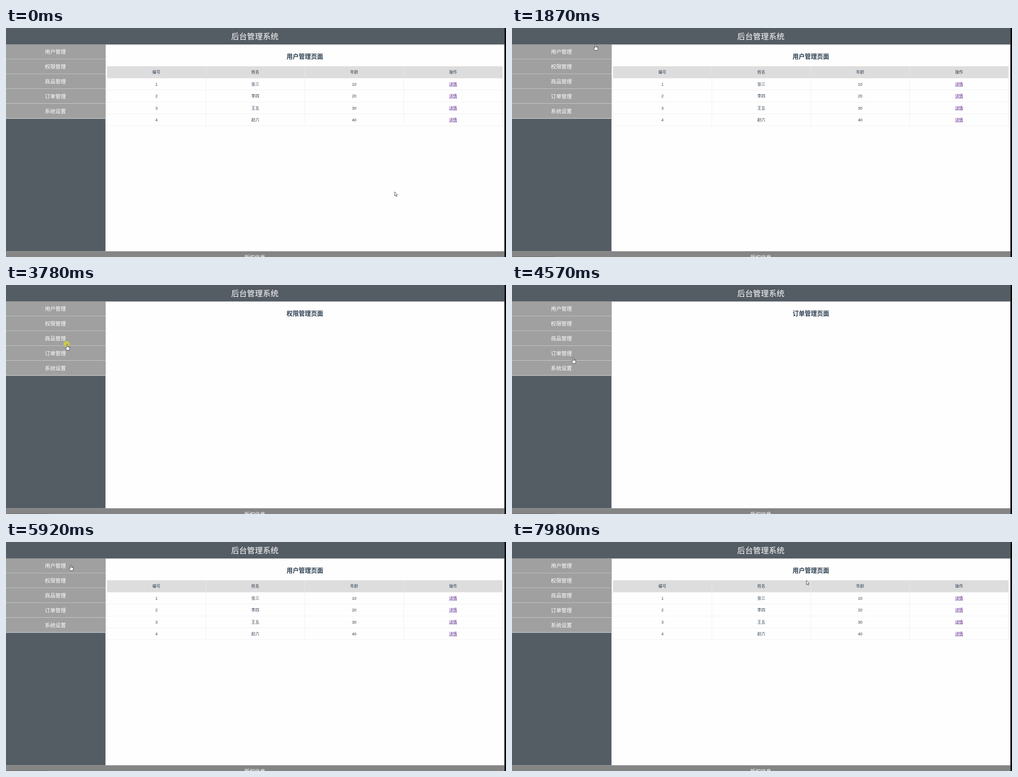
An HTML page for the animation above (8000 ms loop, 1103 by 508 pixels).

```html
<!DOCTYPE html>
<html lang="zh-CN">
<head>
<meta charset="utf-8">
<title>后台管理系统</title>
<style>
  html, body { margin: 0; width: 100%; height: 100%; overflow: hidden; background: #fefefe; }
  svg { display: block; width: 100%; height: 100%; }
  text { font-family: "Liberation Sans", "Noto Sans CJK SC", "Noto Sans CJK", sans-serif; text-anchor: middle; }
</style>
</head>
<body>
<svg id="stage" viewBox="0 0 1103 508" xmlns="http://www.w3.org/2000/svg"></svg>
<script>
const NS = 'http://www.w3.org/2000/svg';
const stage = document.getElementById('stage');
const LOOP = 8000, STEP = 80;
const INK = '#2c3e50';

function add(tag, attrs, parent = stage) {
  const el = document.createElementNS(NS, tag);
  for (const k in attrs) el.setAttribute(k, attrs[k]);
  parent.appendChild(el);
  return el;
}
const rect = (x, y, width, height, fill, parent) => add('rect', { x, y, width, height, fill }, parent);

// Text centred on (x, cy)
function label(str, x, cy, size, fill, parent = stage, weight = 400) {
  const el = add('text', { x, y: cy + size * 0.37, 'font-size': size, fill, 'font-weight': weight }, parent);
  el.textContent = str;
  return el;
}
const show = (el, on) => el.setAttribute('visibility', on ? 'visible' : 'hidden');
const inside = (x, y, l, t, r, b) => x >= l && x <= r && y >= t && y <= b;

// Layout: a page with 50px header and 45px menu items, scaled down
const S = 0.7315, HEAD = 50 * S, SIDE = 300 * S, ITEM = 45 * S, RIGHT = 1099.5, FOOT = 495.3;
const menu = ['用户管理', '权限管理', '商品管理', '订单管理', '系统设置'];
rect(0, 0, 1103, 508, '#fefefe');
rect(0, 0, RIGHT, HEAD, '#545c64');
rect(0, HEAD, SIDE, FOOT - HEAD, '#545c64');
label('后台管理系统', 549, 18.3, 17.4, '#fff');
menu.forEach((name, i) => {
  const y = HEAD + i * ITEM;
  rect(0, y, SIDE, ITEM, '#9fa09f');
  rect(0, y + ITEM - S, SIDE, S, '#fff');
  label(name, 109, y + ITEM / 2, 11.6, '#fff');
});
rect(0, FOOT, RIGHT, 508 - FOOT, '#858585');
label('版权信息', 549, 508.8, 11.6, '#fff');
const status = rect(0, 507, 0, 1, '#6a6a6a');
rect(RIGHT, 0, 1103 - RIGHT, 508, '#000');

const title = label('', 659.3, 63, 13.45, INK, stage, 700);

// User table
const table = add('g', {});
const LEFT = 222.8, TOP = 84.9, COL = 218.1, ROW = 26.4;
rect(LEFT, TOP, COL * 4, ROW, '#dddddd', table);
for (let i = 0; i <= 4; i++) {
  rect(LEFT + COL * i - S / 2, TOP, S, ROW * 5, '#ebebeb', table);
  rect(LEFT, TOP + ROW * (i + 1) - S / 2, COL * 4, S, '#ebebeb', table);
}
const rows = [['编号', '姓名', '年龄', '操作'],
  ...['张三', '李四', '王五', '赵六'].map((name, i) => [i + 1, name, (i + 1) * 10, '详情'])];
rows.forEach((cells, r) => cells.forEach((cell, c) => {
  const link = r > 0 && c === 3;
  const x = LEFT + COL * (c + 0.5), y = TOP + ROW * (r + 0.5);
  label(cell, x, y, 8.75, link ? '#551a8b' : INK, table, r ? 400 : 500);
  if (link) rect(x - 8.8, y + 4.2, 17.6, S, '#551a8b', table);
}));

// Detail page
const detail = add('g', {});
add('rect', { x: 636, y: 85.3, width: 46.6, height: 20.4, rx: 1.6, fill: '#ecf5ff', stroke: '#a9d4fa', 'stroke-width': 0.9 }, detail);
label('返回', 659.3, 95.6, 8.75, '#39434d', detail);

// Pointer
const dot = add('circle', { r: 6.8, fill: '#d3cf3c', 'fill-opacity': 0.88 });
const line = { fill: '#fff', stroke: '#23272e', 'stroke-width': 0.8, 'stroke-linejoin': 'round' };
const arrow = add('path', { d: 'M.4 .4V9.6L2.5 7.7L4 11L5.5 10.3L4.1 7.1H6.7Z', ...line });
const hand = add('path', {
  d: 'M-1.2 1.3C-1.2-.1 1.1-.1 1.1 1.3V5.1L4 5.7C5.3 6 5.8 6.6 5.6 8L5 11.5L4.4 13.5H-1' +
     'L-3.6 9.6C-4.6 8.2-3.4 7.2-2.4 8L-1.2 9.1ZM1.1 5.1V7M2.9 5.5V7.2M4.4 5.9V7.4', ...line
});

// Pointer moves: start, end, x, y
const moves = [
  [70, 300, 579, 278], [450, 1020, 161, 42], [1410, 1570, 158, 42], [1870, 1870, 184, 36],
  [1950, 2200, 256, -14], [2580, 3060, 127, 85], [3460, 3780, 135, 131], [4010, 4330, 135, 156],
  [4570, 4810, 137, 185], [4970, 5370, 151, 45], [5450, 5770, 143, 50], [6000, 6160, 300, 9],
  [6240, 6560, 955, 134], [6640, 6800, 989, 122], [7270, 7660, 660, 93], [7740, 7900, 649, 85]
];

// Each page opens one step after a click
const USERS = menu[0] + '页面', DETAIL = '用户详情页面---用户id为:1';
const headings = [...menu.map(name => name + '页面'), USERS, DETAIL, USERS];
const opens = [0, 3220, 3860, 4490, 4970, 5920, 7040, 7970];

const ease = k => k * k * (3 - 2 * k);

// The screen refreshes in steps, the first one at the start of a move
function pointerAt(t) {
  let x = 857, y = 363;
  for (const [from, to, tx, ty] of moves) {
    if (t < from) break;
    const count = Math.round((to - from) / STEP) + 1;
    const k = ease(Math.min(1, (Math.floor((t - from) / STEP) + 1) / count));
    x += (tx - x) * k;
    y += (ty - y) * k;
  }
  return [x, y];
}

function draw(t) {
  const [x, y] = pointerAt(t);
  const heading = headings[opens.filter(open => open <= t).length - 1];
  title.textContent = heading;
  show(table, heading === USERS);
  show(detail, heading === DETAIL);

  const onMenu = inside(x, y, 0, 35, SIDE, HEAD + 5 * ITEM);
  const onLink = inside(x, y, 977, 120, 996, 130);
  const onButton = heading === DETAIL && inside(x, y, 636, 85, 683, 106);
  const pointing = onMenu || onButton || (onLink && heading === USERS);
  const place = `translate(${x.toFixed(2)} ${y.toFixed(2)})`;
  arrow.setAttribute('transform', place);
  hand.setAttribute('transform', place);
  show(arrow, !pointing);
  show(hand, pointing);

  dot.setAttribute('cx', x - 1.2);
  dot.setAttribute('cy', y + 0.3);
  show(dot, opens.some(open => t < open && t >= open - STEP));
  status.setAttribute('width', onMenu ? 93 : onLink ? 62 : 0);
}

const start = performance.now();
function tick() {
  draw((performance.now() - start) % LOOP);
  requestAnimationFrame(tick);
}
draw(0);
requestAnimationFrame(tick);
</script>
</body>
</html>
```
